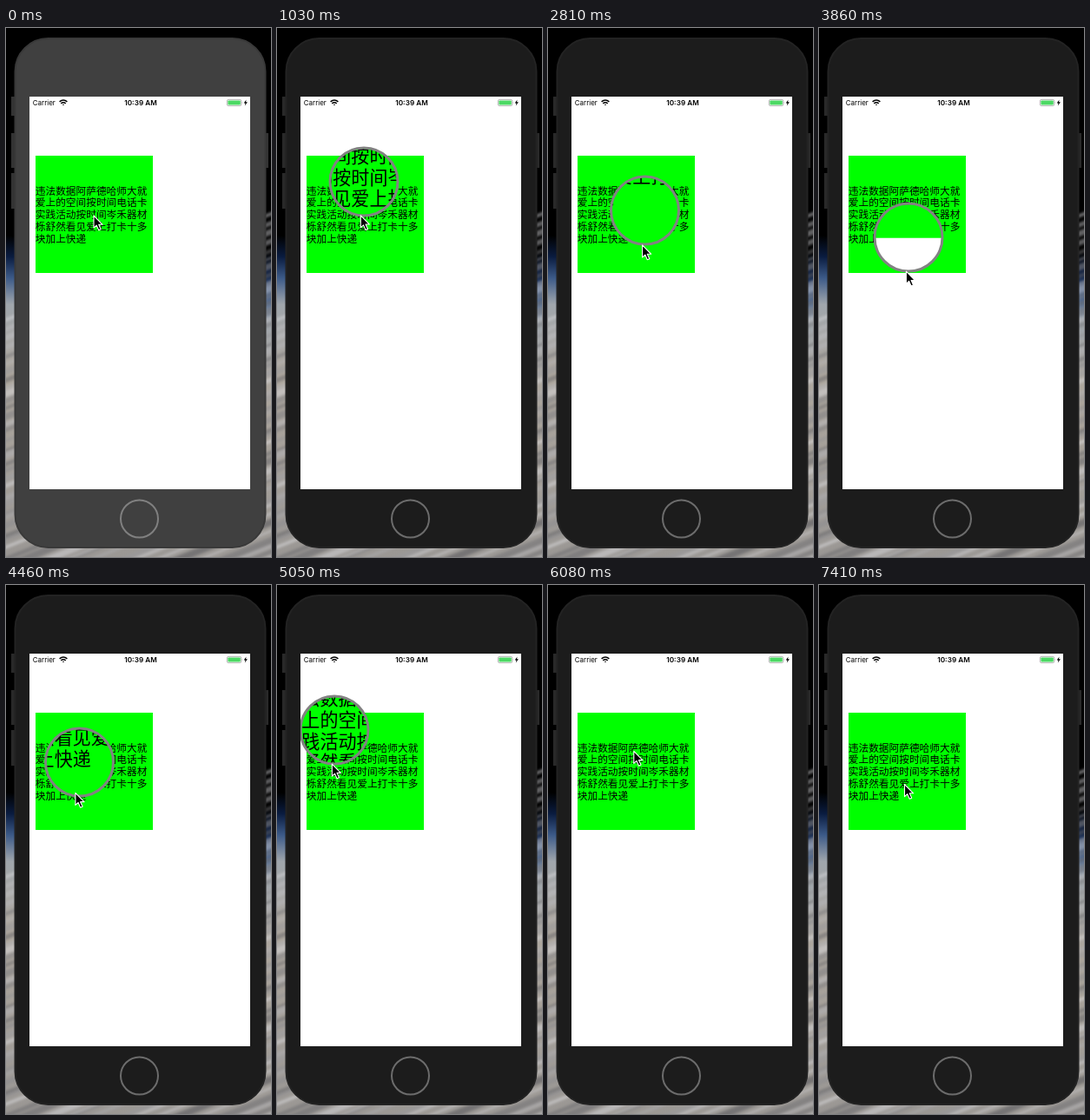
These frames come from a looping animation (305 px wide and 609 px high, 8 s). An HTML page:

```html
<!DOCTYPE html>
<html lang="zh-CN">
<head>
<meta charset="utf-8">
<title>Magnifier demo</title>
<style>
html, body { margin: 0; width: 100%; height: 100%; overflow: hidden; background: #000; }
svg { display: block; width: 305px; height: 609px; }
.label { font: 11.7px "Noto Sans CJK SC", "Noto Sans CJK", sans-serif; }
.status { font: 8px Inter, Roboto, sans-serif; }
.clock { font-size: 8.2px; font-weight: 600; text-anchor: middle; }
#phone { --body: #1c1c1c; --edge: #232323; --key: #292929; --home: #6c6c6c; }
#phone.idle { --body: #404040; --edge: #393939; --key: #333; --home: #808080; }
.body { fill: var(--body); stroke: var(--edge); stroke-width: 2; }
.keys { fill: var(--key); }
.home { fill: none; stroke: var(--home); stroke-width: 2; }
</style>
</head>
<body>
<svg viewBox="0 0 305 609">
  <defs>
    <linearGradient id="sky" gradientUnits="userSpaceOnUse" x1="0" y1="0" x2="-40" y2="609">
      <stop offset=".39" stop-color="#000"/>
      <stop offset=".43" stop-color="#0a1c40"/>
      <stop offset=".47" stop-color="#3c5a88"/>
      <stop offset=".52" stop-color="#a0a6ac"/>
      <stop offset=".65" stop-color="#aea79e"/>
      <stop offset="1" stop-color="#9a9794"/>
    </linearGradient>
    <filter id="soft"><feGaussianBlur stdDeviation="1.5"/></filter>
    <clipPath id="screen"><rect x="27" y="79" width="254" height="452"/></clipPath>
    <clipPath id="lens"><circle r="39"/></clipPath>
  </defs>

  <rect width="305" height="609" fill="url(#sky)"/>
  <g id="clouds" filter="url(#soft)" opacity=".5"></g>

  <g id="phone" class="idle">
    <g class="keys">
      <rect x="6" y="79" width="6" height="22"/>
      <rect x="6" y="121" width="6" height="40"/>
      <rect x="6" y="167" width="6" height="41"/>
      <rect x="296" y="121" width="6" height="40"/>
    </g>
    <rect class="body" x="10.5" y="12" width="288" height="586" rx="38"/>
    <circle class="home" cx="153.5" cy="565" r="21.5"/>
  </g>

  <g clip-path="url(#screen)">
    <g id="page">
      <rect x="27" y="79" width="254" height="452" fill="#fff"/>
      <text class="status" x="30.7" y="88.8">Carrier</text>
      <g fill="none" stroke="#000" stroke-width="1.5">
        <path d="M61.6 84.9Q66 81.2 70.4 84.9M63.3 86.8Q66 84.7 68.7 86.8"/>
        <path d="M66 89.3L64.9 88.1Q66 87.3 67.1 88.1Z" fill="#000" stroke="none"/>
      </g>
      <text class="status clock" x="155" y="88.8">10:39 AM</text>
      <rect x="254.4" y="82.4" width="16.4" height="7.2" rx="1.6" fill="#fff" stroke="#999" stroke-width=".7"/>
      <rect x="255.4" y="83.4" width="14.4" height="5.2" rx=".8" fill="#4cd964"/>
      <path d="M271.6 84.8Q272.8 86 271.6 87.2Z" fill="#999"/>
      <path d="M276.6 82.6L273.7 86.6H275.5L274.9 89.4L277.9 85.3H276Z"/>
      <rect x="34" y="147" width="135" height="135" fill="#0f0"/>
      <g id="label" class="label"></g>
    </g>
    <g id="loupe">
      <g clip-path="url(#lens)">
        <rect x="-40" y="-40" width="80" height="80" fill="#fff"/>
        <use id="zoom" href="#page"/>
      </g>
      <circle r="39" fill="none" stroke="#828282" stroke-width="3"/>
    </g>
  </g>
  <path id="cursor" d="M.5 .5V14.6L3.7 11.6L6.2 17.3L8.7 16.2L6.2 10.8H10.6Z" stroke="#fff" stroke-width="1.1" stroke-linejoin="round"/>
</svg>
<script>
const LOOP = 8000, TICK = 148.2, PHASE = 20;
const WAKE = 1, SHOW = 4, HIDE = 41;
const ZOOM = 1.8, LIFT = 40.6;
const LAG = .3; // ticks the loupe trails the pointer
const $ = id => document.getElementById(id);

const lines = [
  '违法数据阿萨德哈师大就',
  '爱上的空间按时间电话卡',
  '实践活动按时间岑禾器材',
  '栎舒然看见爱上打卡十多',
  '块加上快递'
];
$('label').innerHTML = lines.map((s, i) =>
  `<text x="33.8" y="${191.6 + i * 13.75}">${s}</text>`).join('');

let seed = 7;
const rand = () => (seed = seed * 16807 % 2147483647) / 2147483647;

// slanted cloud streaks
$('clouds').innerHTML = Array.from({ length: 45 }, (_, i) => {
  const y = 340 + i * 9 + rand() * 8, tone = 80 + rand() * 150;
  return `<path d="M-10 ${y}L315 ${y - 130}" stroke-width="${2 + rand() * 6}"
    stroke="rgb(${tone} ${tone} ${tone + 4})"/>`;
}).join('');

// turning points of the drag: tick, x, y
const path = [
  [6, 103.5, 176.5], [7, 100, 177], [9, 80.5, 165], [12, 110.5, 180],
  [16, 74.5, 202], [19, 111.5, 210], [22, 97, 226], [24, 112.5, 233],
  [26, 103, 241], [34, 66, 167], [36, 63, 159.5], [40, 99.5, 151.5],
  [42, 102, 152], [44, 118.5, 173], [46, 101, 188], [50, 101, 190]
];

function at(k) {
  const t = Math.min(Math.max(k, path[0][0]), path[path.length - 1][0]);
  const i = Math.max(1, path.findIndex(p => p[0] >= t));
  const [t0, x0, y0] = path[i - 1], [t1, x1, y1] = path[i];
  const u = (t - t0) / (t1 - t0), e = u * u * (3 - 2 * u);
  return [x0 + (x1 - x0) * e, y0 + (y1 - y0) * e];
}

const move = (el, x, y) => el.setAttribute('transform', `translate(${x} ${y})`);

function draw(now) {
  const k = Math.floor((now % LOOP + PHASE) / TICK);
  const [x, y] = at(k), [px, py] = at(k + LAG);
  $('phone').classList.toggle('idle', k < WAKE);
  $('loupe').style.display = k >= SHOW && k < HIDE ? '' : 'none';
  move($('loupe'), x, y);
  $('zoom').setAttribute('transform', `scale(${ZOOM}) translate(${-x - .4} ${-y - LIFT})`);
  move($('cursor'), px - 3, py + 39);
}

const start = performance.now();
function frame() {
  draw(performance.now() - start);
  requestAnimationFrame(frame);
}
frame();
</script>
</body>
</html>
```
